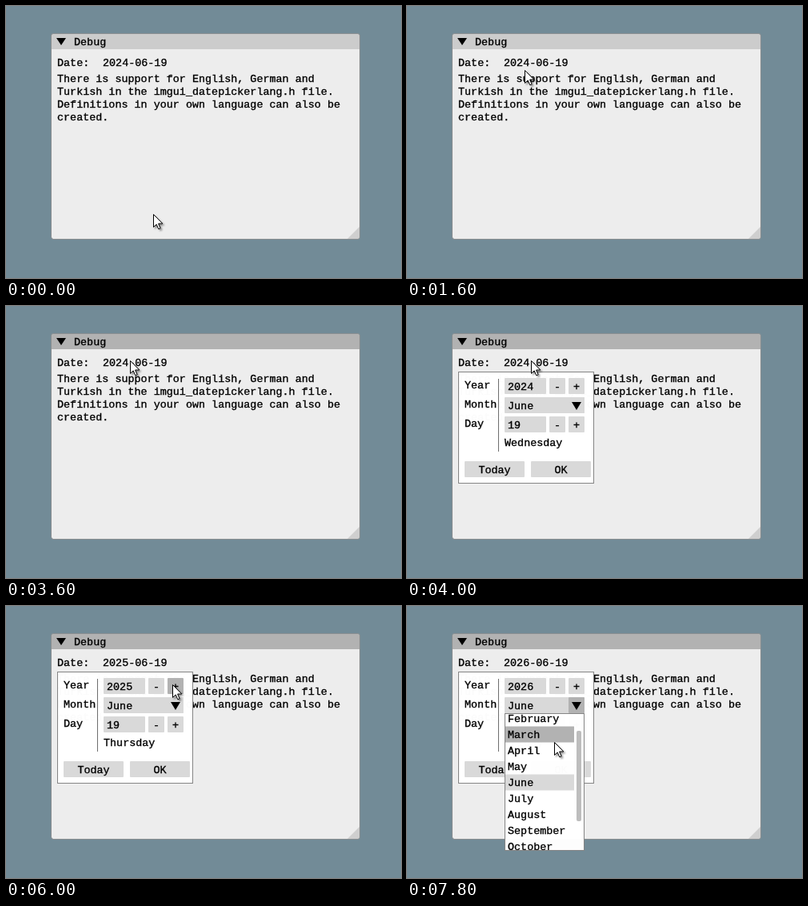
These frames come from a looping animation (494x340 px, 8000 ms). An HTML page:

```html
<!DOCTYPE html>
<html lang="en">
<head>
<meta charset="utf-8">
<title>Date picker</title>
<style>
  html, body { margin: 0; width: 100%; height: 100%; overflow: hidden; background: #728b97; }
  svg { display: block; width: 494px; height: 340px; }
  text {
    font: 13.42px "Liberation Mono", "Courier New", monospace;
    fill: #000; stroke: #000; stroke-width: .35px; white-space: pre;
  }
  .mid { text-anchor: middle; }
  #cursor { filter: drop-shadow(2px 2px 1.2px rgba(0, 0, 0, .4)); }
</style>
</head>
<body>
<svg id="stage" viewBox="0 0 494 340" xmlns="http://www.w3.org/2000/svg">
  <defs>
    <clipPath id="listClip"><rect x="123" y="135" width="98" height="170"/></clipPath>
  </defs>
  <rect width="494" height="340" fill="#728b97"/>
  <rect x="57" y="35" width="385" height="256" rx="2" fill="#ededed"/>
  <path id="title" d="M57 54V37a2 2 0 0 1 2-2H440a2 2 0 0 1 2 2V54Z"/>
  <path d="M427 291L442 276V289a2 2 0 0 1-2 2Z" fill="#cfcfcf"/>
  <rect x="56.5" y="34.5" width="386" height="257" rx="2.5" fill="none" stroke="#8b8f91"/>
  <path d="M63 40H75L69 49Z"/>
  <g id="body"></g>
  <g id="popup">
    <rect x="64.5" y="82.5" width="169" height="139" fill="#fff" fill-opacity=".985" stroke="#858585"/>
    <path d="M114.5 91V182" stroke="#6e6e6e"/>
    <g id="form"></g>
  </g>
  <g id="list">
    <rect x="122.5" y="134.5" width="99" height="171" fill="#fff" fill-opacity=".985" stroke="#858585"/>
    <g id="items" clip-path="url(#listClip)"></g>
    <rect x="212" y="156" width="6" height="113" rx="2" fill="#bdbdbd"/>
  </g>
  <path id="cursor" d="M.5 .5V16.4L4.2 12.9L6.8 18.8L9.1 17.8L6.6 12H11.8Z" fill="#fff" stroke="#000"/>
</svg>
<script>
const LOOP = 8000, STEP = 200;
const IDLE = '#d9d9d9', HOT = '#b2b2b2', TITLE = '#cccccc';
const $ = id => document.getElementById(id);

function add(parent, tag, attrs) {
  const el = document.createElementNS('http://www.w3.org/2000/svg', tag);
  for (const k in attrs) el.setAttribute(k, attrs[k]);
  return $(parent).appendChild(el);
}
function label(parent, x, y, str, cls = '') {
  const el = add(parent, 'text', { x, y, class: cls });
  el.textContent = str;
  return el;
}
const box = (parent, x, y, width, height = 20, rx = 1) =>
  add(parent, 'rect', { x, y, width, height, rx, fill: IDLE });

// Window contents
label('body', 85, 49, 'Debug');
label('body', 64, 75, 'Date:');
const date = label('body', 121, 75, '');
['There is support for English, German and',
 'Turkish in the imgui_datepickerlang.h file.',
 'Definitions in your own language can also be',
 'created.'].forEach((s, i) => label('body', 64, 95 + 16 * i, s));

// Date form
const buttons = [];
function button(x, y, w, str) {
  buttons.push({ x, y, w, el: box('form', x, y, w) });
  label('form', x + w / 2, y + 15, str, 'mid');
}
['Year', 'Month', 'Day'].forEach((s, i) => label('form', 72, 103 + 24 * i, s));
for (const y of [90, 138]) {
  box('form', 122, y, 52);
  button(178, y, 20, '-');
  button(202, y, 20, '+');
}
const combo = box('form', 122, 114, 100);
const arrow = box('form', 202, 114, 20);
add('form', 'path', { d: 'M206 120H218L212 130Z' });
const year = label('form', 126, 105, '');
label('form', 126, 129, 'June');
label('form', 126, 153, '19');
const weekday = label('form', 122, 175, '');
button(72, 194, 75, 'Today');
button(155, 194, 75, 'OK');

// Month list
const rows = ['February', 'March', 'April', 'May', 'June', 'July',
  'August', 'September', 'October'].map((s, i) => {
  const y = 130.5 + 20 * i;
  const el = box('items', 123, y, 86, 20, 0);
  label('items', 126, y + 14.5, s);
  return { y, el, chosen: s === 'June' };
});

// Pointer path: time, x, y
const path = [
  [0, 184, 260], [1000, 150, 67], [1400, 150, 67], [1600, 147, 80],
  [2000, 128, 100], [2400, 178, 104], [2600, 155, 102], [2800, 155, 102],
  [3000, 152, 98], [3600, 155, 68], [4400, 155, 68], [5200, 197, 96],
  [5600, 207, 98], [6200, 208, 98], [6800, 208, 118], [7200, 208, 118],
  [7400, 208, 121], [7800, 184, 170], [8000, 184, 170]
];
function pointer(t) {
  const i = path.findIndex(p => p[0] > t);
  const [t0, x0, y0] = path[i - 1], [t1, x1, y1] = path[i];
  const u = (t - t0) / (t1 - t0), e = u * u * (3 - 2 * u);
  return [x0 + (x1 - x0) * e, y0 + (y1 - y0) * e];
}
const inside = (px, py, x, y, w, h = 20) => px >= x && px < x + w && py >= y && py < y + h;
const show = (id, on) => $(id).setAttribute('visibility', on ? 'visible' : 'hidden');
const paint = (el, hot) => el.setAttribute('fill', hot ? HOT : IDLE);

function draw(time) {
  const t = Math.floor(time / STEP) * STEP;
  const [x, y] = pointer(t);
  const open = t >= 4000, listed = t >= 7400;
  const n = 2024 + (t >= 5800) + (t >= 6200);

  $('title').setAttribute('fill', t >= 3600 ? HOT : TITLE);
  show('popup', open);
  show('list', listed);
  date.textContent = n + '-06-19';
  year.textContent = n;
  weekday.textContent = ['Wednesday', 'Thursday', 'Friday'][n - 2024];

  for (const b of buttons) paint(b.el, !listed && inside(x, y, b.x, b.y, b.w));
  const over = !listed && inside(x, y, 122, 114, 100);
  paint(combo, over);
  paint(arrow, over || listed);
  for (const r of rows) {
    const hot = listed && y > 135 && inside(x, y, 123, r.y, 86);
    paint(r.el, hot);
    r.el.setAttribute('fill-opacity', hot || r.chosen ? 1 : 0);
  }
  $('cursor').setAttribute('transform', `translate(${Math.round(x)} ${Math.round(y)})`);
}

const start = performance.now();
function tick() {
  draw((performance.now() - start) % LOOP);
  requestAnimationFrame(tick);
}
tick();
</script>
</body>
</html>
```
